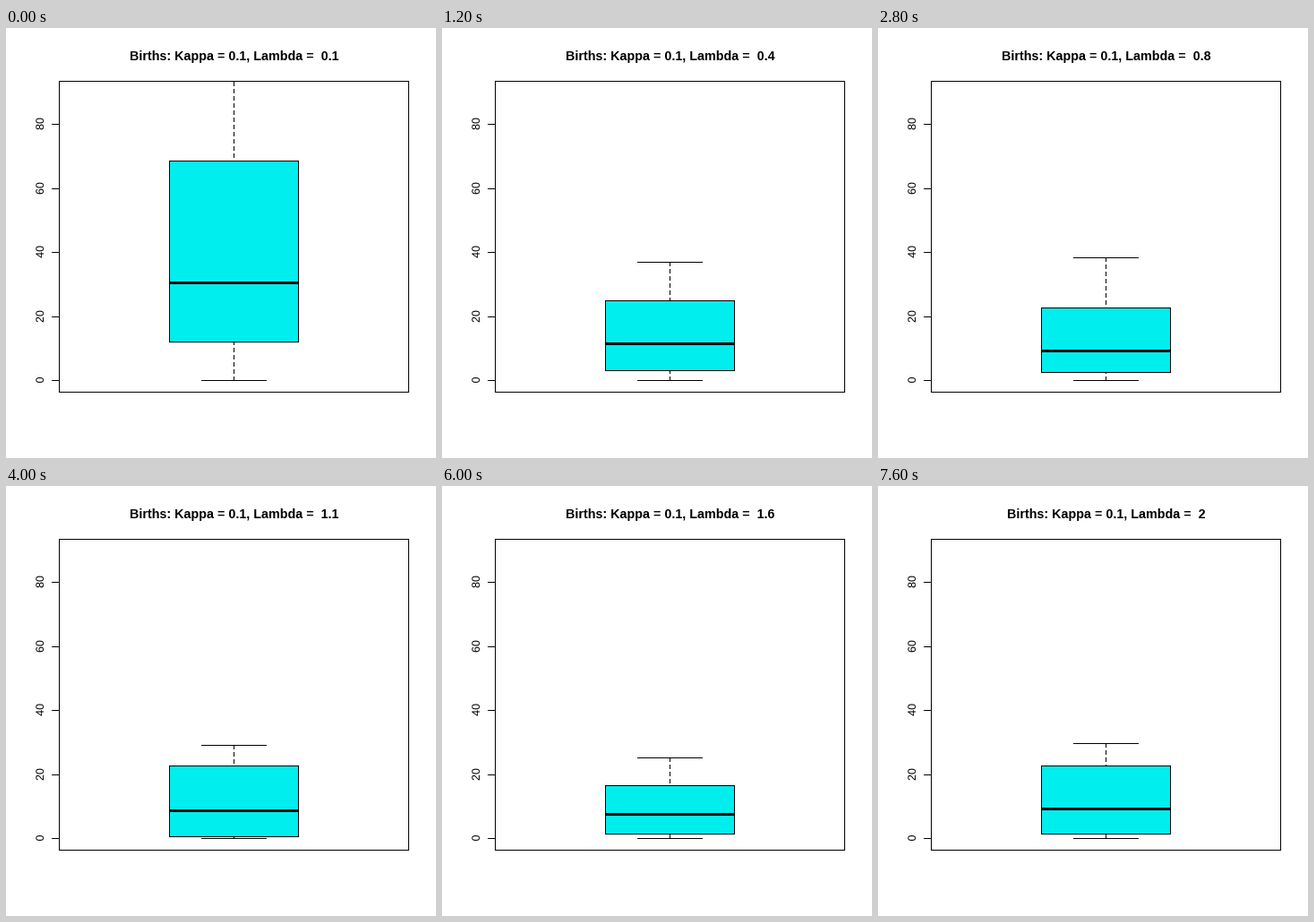
Recreate the animation shown at these times as a matplotlib script. Size 480 by 480 pixels, loop 8 s.

```python
import numpy as np
import matplotlib.pyplot as plt
from matplotlib.animation import FuncAnimation
from matplotlib.patches import PathPatch, Rectangle
from matplotlib.path import Path
from matplotlib.textpath import TextPath

SIZE = 480
STEPS = 20
INTERVAL = 400
LEFT, TOP, RIGHT, BOTTOM = 59, 59, 449, 406
BOX_LEFT, BOX_RIGHT, CENTER = 182, 326, 254
CYAN = "#00eeee"
FONT = "Liberation Sans"

# Births at a few values of lambda; other steps are interpolated on a log scale
KEY_LAMBDA = [0.1, 0.3, 0.4, 0.8, 1.1, 1.4, 1.8, 2.0]
WHISKER = [102, 59.6, 37, 38.4, 29.1, 28.3, 22.7, 29.7]
UPPER = [68.6, 35, 24.9, 22.7, 22.7, 15.7, 17.1, 22.7]
MEDIAN = [30.5, 16.5, 11.5, 9.3, 8.7, 8.4, 7, 9.3]
LOWER = [12.1, 10.7, 3.1, 2.5, 0.6, 1.4, 1.2, 1.4]

plt.rcParams["font.family"] = FONT
fig = plt.figure(figsize=(SIZE / 100, SIZE / 100), dpi=100, facecolor="white")
ax = fig.add_axes([0, 0, 1, 1])
ax.set_xlim(0, SIZE)
ax.set_ylim(SIZE, 0)
ax.axis("off")


def row_of(value):
    return int(393.6 - 3.575 * value)


def block(x0, y0, x1, y1, color="black", z=1):
    """Fill the pixels from (x0, y0) to (x1, y1), both included."""
    return ax.add_patch(Rectangle((x0, y0), x1 - x0 + 1, y1 - y0 + 1, lw=0,
                                  facecolor=color, antialiased=False, zorder=z))


def framed(x0, y0, x1, y1, fill, z=1):
    return [block(x0, y0, x1, y1, "black", z),
            block(x0 + 1, y0 + 1, x1 - 1, y1 - 1, fill, z + 0.1)]


def whisker_line(tip, end):
    """Cap at the tip and a dashed line that starts there."""
    parts = [block(218, tip, 290, tip, z=2)] if tip > TOP else []
    step = 1 if end > tip else -1
    for offset in range(0, abs(end - tip), 8):
        a = tip + step * offset
        b = a + step * min(4, abs(end - a))
        low, high = max(min(a, b), TOP), max(a, b)
        if high >= TOP:
            parts.append(block(CENTER, low, CENTER, high, z=2))
    return parts


def upright_label(text, baseline, middle):
    """Text that reads upwards, drawn as outlines for exact placement."""
    path = TextPath((0, 0), text, size=12.5, prop={"family": FONT})
    u, v = path.vertices.T
    shift = (path.get_extents().x0 + path.get_extents().x1) / 2
    turned = np.column_stack([baseline - v, middle - (u - shift)])
    ax.add_patch(PathPatch(Path(turned, path.codes), fc="black", lw=0, zorder=2))


framed(LEFT, TOP, RIGHT, BOTTOM, "white")
for value in range(0, 100, 20):
    block(51, row_of(value), LEFT, row_of(value), z=2)
    upright_label(str(value), 42, row_of(value))

title = ax.text(CENTER + 0.5, 36, "", fontsize=14.2 * 0.72, weight="bold",
                ha="center", va="baseline")
moving = []


def update(step):
    while moving:
        moving.pop().remove()
    lam = (step + 1) / 10
    whisker, upper, median, lower = (
        row_of(np.interp(np.log(lam), np.log(KEY_LAMBDA), births))
        for births in (WHISKER, UPPER, MEDIAN, LOWER))
    title.set_text(f"Births: Kappa = 0.1, Lambda =  {lam:g}")
    moving.extend(whisker_line(whisker, upper) + whisker_line(row_of(0), lower))
    moving.extend(framed(BOX_LEFT, upper, BOX_RIGHT, lower, CYAN, z=3))
    moving.append(block(BOX_LEFT, median - 1, BOX_RIGHT, median + 1, z=4))
    return [title, *moving]


anim = FuncAnimation(fig, update, frames=STEPS, interval=INTERVAL,
                     init_func=lambda: update(0), repeat=True, repeat_delay=0)
plt.show()
```
